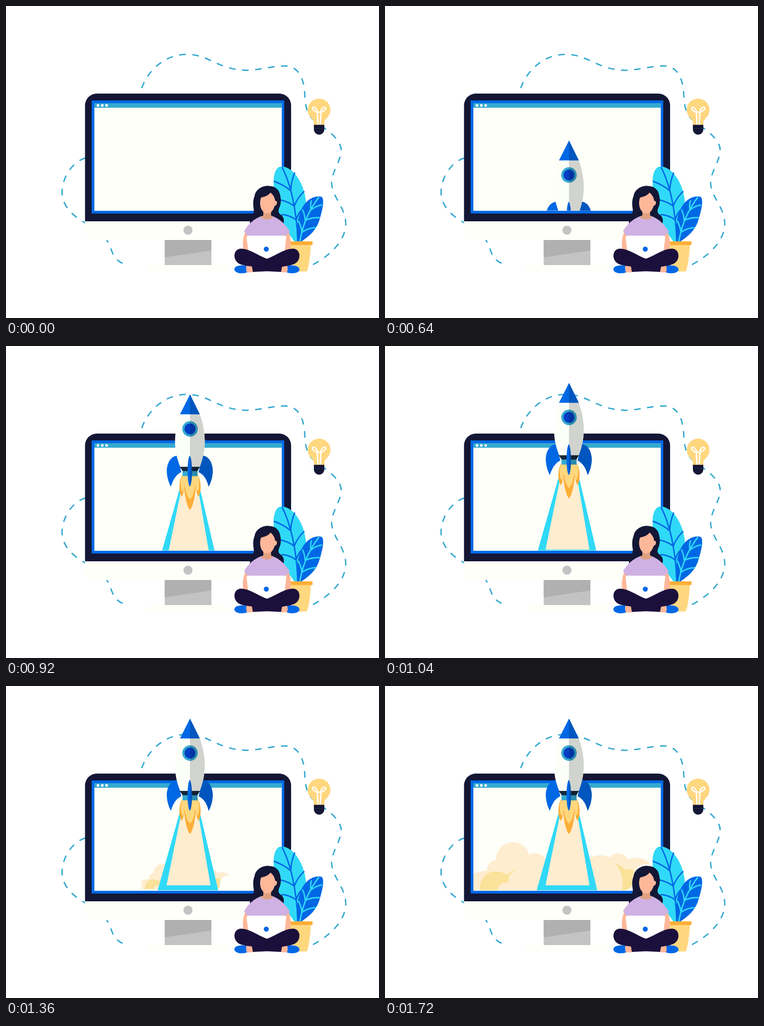
Recreate the animation shown at these times as an HTML page. Size 819 by 684 pixels, loop 2.2 s.

```html
<!DOCTYPE html>
<html lang="en">
<head>
<meta charset="utf-8">
<title>Rocket launch</title>
<style>
  html, body { margin: 0; width: 100%; height: 100%; overflow: hidden; background: #fff; }
  svg { display: block; width: 819px; height: 684px; }
  .blue { fill: #0068e5; }
  .teal { fill: #35a9d0; }
  .cyan { fill: #30d9f7; }
  .navy { fill: #141635; }
  .paper { fill: #fefff9; }
  .cream { fill: #ffedd0; }
  .straw { fill: #fae29a; }
  .yellow { fill: #ffd77e; }
  .orange { fill: #fdae37; }
  .skin { fill: #ffb799; }
  .legs { fill: #1b103c; }
  .line { fill: none; stroke-width: 3; }
  .dash { stroke: #35a9cf; stroke-dasharray: 1 1; }
  .shade { filter: brightness(.83); }
</style>
</head>
<body>
<svg viewBox="0 0 819 684">
  <defs>
    <clipPath id="ground"><path d="M0 0H819V448.5H0Z"/></clipPath>
    <clipPath id="rightHalf"><path d="M404 0H480V400H404Z"/></clipPath>
    <clipPath id="leftEdge"><path d="M194 300H420V448.5H194Z"/></clipPath>
  </defs>

  <!-- dashed trail -->
  <g class="line dash">
    <path pathLength="35" d="M298 180C313 138 351 106 397 106C446 106 466 140 528 141C560 140 585 131 615 131.500C645 133 655 164 656 195C657 222 662 240 678 252"/>
    <path pathLength="25" d="M691 262C712 276 736 296 736 316C735 342 715 362 715 389C717 420 746 442 746 478C745 520 704 551 674 567"/>
    <path pathLength="13" d="M175 333C146 341 123 376 123 409C124 442 151 464 181 479"/>
    <path pathLength="5" d="M216 507C234 523 228 553 256 564"/>
  </g>

  <!-- monitor -->
  <path class="paper" d="M173.500 471H626V493Q626 513 606 513H193Q173.500 513 173.500 493ZM309 568H490V584H309Z"/>
  <path class="navy" d="M173.500 472V218A26 26 0 0 1 199.500 192H600A26 26 0 0 1 626 218V472Z"/>
  <path class="blue" d="M188 207H611V455H188Z"/>
  <path class="paper" d="M194 213H605.500V449H194Z"/>
  <path class="teal" d="M194 213H605.500V223H194Z"/>
  <g fill="#fff"><circle cx="202" cy="218" r="2.900"/><circle cx="211.500" cy="218" r="2.900"/><circle cx="221" cy="218" r="2.900"/></g>
  <circle cx="399.500" cy="491.500" r="10" fill="#c3c3c3"/>
  <path fill="#c3c3c3" d="M348.500 513H451V568H348.500Z"/>
  <path fill="#b0b0b0" d="M348.500 513H451V536L348.500 551Z"/>

  <!-- smoke -->
  <g clip-path="url(#ground)">
    <g id="smokeLeft"><g clip-path="url(#leftEdge)">
      <path class="cream" d="M190 448V414Q206 405 224 405C224 390 234 382 244 381A37 37 0 0 1 317 371C330 362 347 367 353 382L400 400V448Z"/>
      <path class="straw" d="M209 448C207 423 222 406 244 406.500Q258 407 267 414Q276 404 290 404L300 448Z"/>
      <path class="cream" d="M247 448Q249 430 272 430Q268 412 290 403Q325 400 345 415L400 448Z"/>
    </g></g>
    <g id="smokeRight">
      <path class="cream" d="M400 448L445 383C455 369 480 368 494 376C502 363 525 363 533 380C551 373 575 377 583 392Q562 386 549 404L545 425L525 448Z"/>
      <path class="straw" d="M505 390Q518 391 525 402Q536 399 547 404Q541 420 543 438Q536 448 520 448Q524 425 517 409Q514 398 505 390Z"/>
    </g>
  </g>

  <!-- rocket, nose tip at y = 0 -->
  <g clip-path="url(#ground)">
    <g id="rocket">
      <path class="cyan" d="M386 190H422L466 376.500H333Z"/>
      <path class="cream" d="M388.500 190H419L449 365.500H352.500Z"/>
      <path class="orange" d="M386 178C379 191 379 214 386 224C390 219 390 211 391 204C393 222 397 246 404 253C411 246 415 222 417 204C418 211 419 219 423 224C429 214 429 191 422 178Z"/>
      <path class="yellow" d="M387 178C382 188 383 207 388 213Q391 209 392.500 199C394 213 398 225 404 230C410 225 414 213 415.500 199Q417 209 420 213C425 207 426 188 421 178Z"/>
      <g id="hull">
        <path class="blue" d="M376 134C361 136 354 150 353 166C353 180 357 193 362 202C366 190 371 177 385 170ZM432 134C446 136 453 150 454 166C454 180 450 193 445 202C442 190 437 177 423 170Z"/>
        <path class="teal" d="M387.500 167H420.500V179H387.500Z"/>
        <path fill="#13283c" d="M381 158H426L420 168H388Z"/>
        <path fill="#fcfef8" d="M382 43.500C369 81 366 120 382.500 158.500H425.500C441 120 439 81 425.500 43.500Z"/>
        <path class="blue" d="M404 0L425.500 43.500H382Z"/>
        <circle class="teal" cx="404" cy="75.500" r="17"/>
        <circle cx="404" cy="75.500" r="12" fill="#003fc4"/>
        <path class="blue" d="M403.500 134C397 142 397 194 403.500 202C410 194 410 142 403.500 134Z"/>
      </g>
      <use href="#hull" class="shade" clip-path="url(#rightHalf)"/>
    </g>
  </g>

  <!-- light bulb -->
  <path class="yellow" d="M676 261V254C675 248 662.500 242 662.500 228A25 25 0 0 1 712.500 228C712.500 242 700 248 699 254V261Z"/>
  <path class="line" stroke="#fff" d="M685 260L683.500 233C676 231 671 225 674 222.500C679 220 684 228 684 233H691C691 228 696 220 701 222.500C704 225 699 231 691.500 233L690 260"/>
  <path class="navy" d="M676 260.500H699V270A11.500 12 0 0 1 676 270Z"/>
  <path d="M676 268.500H699" stroke="#33345a" stroke-width=".7"/>

  <!-- plant -->
  <path class="cyan" d="M634 517C604 480 587 428 587.500 385C588 365 594 352 605 352C633 352 659 395 659 438C658 470 648 490 647 517Z"/>
  <path class="line" stroke="#0068e5" d="M606 353C620 380 637 430 641 517M588 384Q612 393 625 405Q626 385 634 365M602 425Q620 429 633 438.500Q640 420 655 406M605 457Q625 459 637 469Q641 455 650 446"/>
  <path class="blue" d="M639 517C638 485 640 455 655 435C667 419 684 415 694 419C699 426 696 445 687 473C677 499 659 508 648 517Z"/>
  <path class="line" stroke="#30d9f7" d="M687 419C667 445 652 475 645 517M671 426Q667 437 670 447Q679 439 694 436M651 446Q656 457 657 470Q672 463 689 464M642 471Q648 483 650 496Q664 486 681 486"/>
  <path class="yellow" d="M618 523H669.500C668 545 666 568 660.500 582H635Z"/>
  <path class="orange" d="M618 516H673V524H618Z"/>

  <!-- woman -->
  <path class="navy" d="M577 394.500C564 393 548 402 546 416C541 428 543 438 544 446C545 459 536 461 535.500 477L575 490L609 477C612 468 609 462 604 458C596 453 598 448 601 440C605 432 604 417 599 406C593 397 586 395 577 394.500Z"/>
  <path class="skin" d="M525 497C519 510 519 527 522 538L535 545V497ZM621 496C626 510 627 525 623 538L608 545V497Z"/>
  <path fill="#cfb1e3" d="M561 460.500C545 466 531 479 523 493Q525 500 532 504H612Q620 500 623 494C614 479 600 466 585 460.500Z"/>
  <path fill="#e0a181" d="M565 446H582V459L587 463Q573 473 559 463L565 459Z"/>
  <path class="skin" d="M581 409Q575 417 560 420C555 433 559 454 574 454.500C583 454 587 447 590 438C596 437 597 426 591 427Q590 417 581 409Z"/>
  <path fill="#fff" d="M532 503.500H612Q616 504 615 509L610 555H534L528.500 509Q528 504 532 503.500Z"/>
  <path class="blue" d="M529 569C514 567 501 570 501.500 578C503 587 522 588 532 583ZM616 569C631 567 645 570 644.500 578C643 587 624 588 614 583Z"/>
  <path class="skin" d="M528 568H541L542 584H529Q526 577 528 568ZM605 568H617Q620 577 617 584H604Z"/>
  <path class="legs" d="M515 532C533 531 553 547 573 554C593 547 613 531 631 532C645 533 648 550 640 560C632 570 615 569 606 572L604 583L573 581.500L542 583L540 571C528 569 513 569 506 560C498 550 501 533 515 532Z"/>
  <circle class="blue" cx="571.500" cy="533" r="5.500"/>
</svg>
<script>
  const LOOP = 2200, STEP = 40;
  // time, height of the nose tip, speed in px/ms
  const flight = [
    [280, 449, 0], [480, 406, -.52], [640, 295, -.82], [800, 159, -.66],
    [840, 137, -.45], [1040, 81, -.1], [1360, 71.5, 0]
  ];
  const get = id => document.getElementById(id);
  const rocket = get('rocket'), smokeLeft = get('smokeLeft'), smokeRight = get('smokeRight');

  function tipAt(t) {
    if (t <= flight[0][0]) return 460;
    const i = flight.findIndex(key => key[0] >= t);
    if (i < 0) return flight[flight.length - 1][1];
    const [t0, y0, v0] = flight[i - 1], [t1, y1, v1] = flight[i];
    const d = t1 - t0, u = (t - t0) / d, w = 1 - u;
    return y0 * w * w * (1 + 2 * u) + y1 * u * u * (3 - 2 * u) + d * u * w * (v0 * w - v1 * u);
  }

  function smoothstep(a, b, t) {
    const p = Math.min(1, Math.max(0, (t - a) / (b - a)));
    return p * p * (3 - 2 * p);
  }

  function scaleAbout(node, x, y, s) {
    node.setAttribute('transform', `translate(${x} ${y}) scale(${s}) translate(${-x} ${-y})`);
  }

  function draw(now) {
    const t = Math.floor(now % LOOP / STEP) * STEP;
    const puff = smoothstep(980, 1720, t);
    rocket.setAttribute('transform', `translate(0 ${tipAt(t)})`);
    scaleAbout(smokeLeft, 410, 443, puff);
    scaleAbout(smokeRight, 390, 443, puff);
    for (const smoke of [smokeLeft, smokeRight]) smoke.style.display = puff ? '' : 'none';
  }

  function tick() {
    draw(performance.now());
    requestAnimationFrame(tick);
  }
  tick();
</script>
</body>
</html>
```
